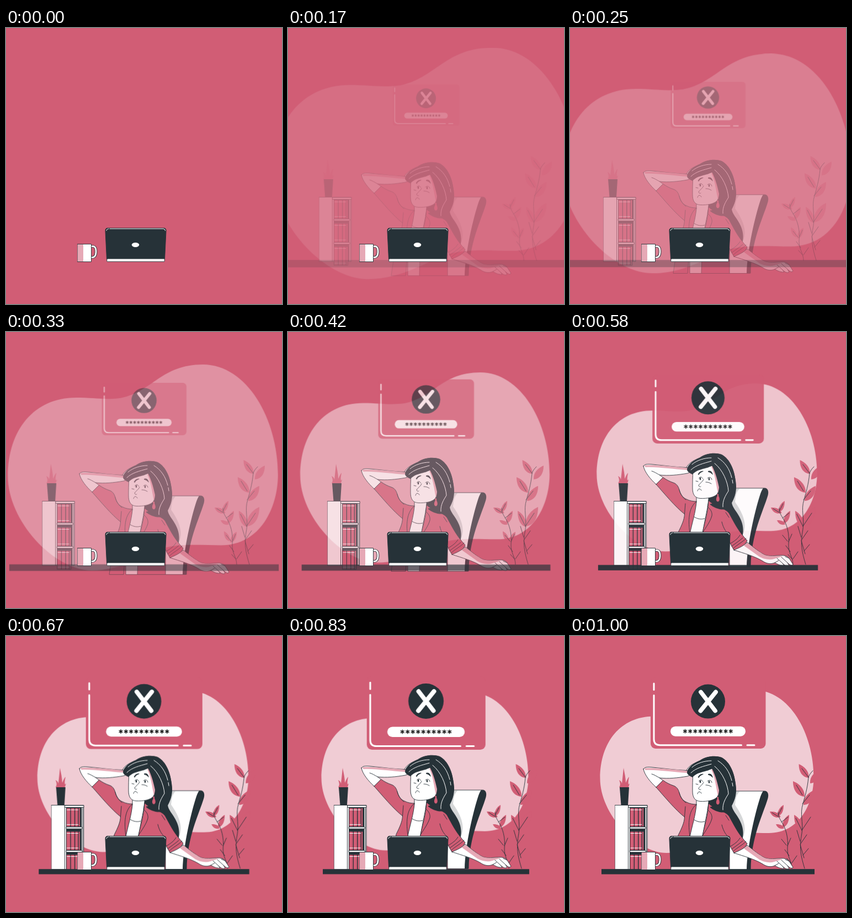
Animation, 500 px wide and 500 px high, one loop 1040 ms. Source, as an HTML page:

```html
<!DOCTYPE html>
<html lang="en">
<head>
<meta charset="utf-8">
<title>Wrong password</title>
<style>
  :root { --red: #d15d75; --dark: #263238; --pale: #e6a9b6; }
  html, body { margin: 0; width: 100%; height: 100%; overflow: hidden; background: var(--red); }
  svg { display: block; width: 100vw; height: 100vh; }

  .enter { animation: enter 1040ms cubic-bezier(.345, .089, .499, 1.367) infinite; }
  .shrink { --from: scale(1.5); }
  .grow { --from: scale(.5); }
  .up { --from: translateY(30px); }
  .right { --from: translateX(-30px); }
  .left { --from: translateX(30px); }
  #blob { transform-origin: 248px 246px; }
  #panel { transform-origin: 250px 139.5px; }
  #desk { transform-origin: 250px 427px; }

  @keyframes enter {
    0% { opacity: 0; transform: var(--from); }
    92.3%, 100% { opacity: 1; transform: none; }
  }

  .w { fill: #fff; }
  .r { fill: var(--red); }
  .d { fill: var(--dark); }
  .p { fill: var(--pale); }
  .line { stroke: var(--dark); stroke-width: .9; stroke-linejoin: round; stroke-linecap: round; }
  .no { fill: none; }
  .shine { fill: none; stroke: #fff; stroke-width: 1; stroke-linecap: round; }
</style>
</head>
<body>
<svg viewBox="0 0 500 500">
  <defs>
    <marker id="star" markerUnits="userSpaceOnUse" markerWidth="10" markerHeight="10" refX="5" refY="5">
      <path d="M5 1.8V8.2M2.2 3.4L7.8 6.6M7.8 3.4L2.2 6.6" stroke="#111" stroke-width="1.5" stroke-linecap="round"/>
    </marker>
    <path id="leaf" d="M0 0C10 4 19 13 18 25C6 24 0 14 0 0Z"/>
    <g id="books">
      <path class="r line" d="M109 0h7.500v34h-7.500zM116.500 0h7.500v34h-7.500zM124 0h6.500v34h-6.500zM130.500 0h3.200v34h-3.200z"/>
      <path class="shine" d="M109.800 3.500h6M117.300 3.500h6M124.800 3.500h5M109.800 30h6M117.300 30h6M124.800 30h5"/>
    </g>
  </defs>

  <path id="blob" class="enter shrink" fill="#f0ccd4" d="M54.500 258C54.500 192 92 145.500 152 145.500C180 145.500 192 149 216 146C262 137 274 98 334 98C397 98 441.500 176 441.500 256C441.500 302 417 357 360 357C330 357 300 354 275 362C240 376 215 393 175 393C120 393 54.500 322 54.500 258Z"/>

  <g id="panel" class="enter grow">
    <rect class="r" x="146" y="75" width="208.500" height="129" rx="9"/>
    <path fill="none" stroke="#fff" stroke-width="3" stroke-linecap="round" d="M152 86V97.500M152 107.500V187Q152 197.700 163 197.700H310.500M321 197.700H334"/>
    <circle class="d" cx="250" cy="118.600" r="31"/>
    <path fill="none" stroke="#fff" stroke-width="7.800" stroke-linecap="round" d="M237 101.500L263 135.500M264 101.500L236.500 135.500"/>
    <rect class="w" x="182" y="163.700" width="136" height="18" rx="9"/>
    <path class="no" marker-start="url(#star)" marker-mid="url(#star)" marker-end="url(#star)" d="M208.500 172.500h9.200h9.200h9.200h9.200h9.200h9.200h9.200h9.200h9.200"/>
  </g>

  <g id="plants" class="enter left">
    <g class="r">
      <use href="#leaf" x="414.500" y="232"/>
      <use href="#leaf" transform="translate(453 242) scale(-1 1)"/>
      <use href="#leaf" transform="translate(404 263) scale(1.150 1.120)"/>
      <use href="#leaf" transform="translate(443 279) scale(-1.100 1.080)"/>
      <use href="#leaf" transform="translate(406 324) scale(.88 1.160)"/>
      <use href="#leaf" transform="translate(443 317) scale(-1.260 1.400)"/>
      <use href="#leaf" transform="translate(362 318) rotate(-22) scale(.8 .66)"/>
      <use href="#leaf" transform="translate(387 306) scale(-.6 .8)"/>
      <use href="#leaf" transform="translate(397 324) scale(-.68 .9)"/>
      <use href="#leaf" transform="translate(373 341) rotate(-22) scale(.62 .5)"/>
      <use href="#leaf" transform="translate(379 361) scale(.6 .72)"/>
      <use href="#leaf" transform="translate(402 362) scale(-.65 .78)"/>
    </g>
    <path class="line no" d="M425 421C418 398 415 384 420 357C423 338 416 322 422 304C425 292 430 278 432 256C433 252 436 248 440 244M421 304L434 288M421 288L410 270M432 256L420 240M420 352L436 328M420 352L409 330M424 402L417 378M422 397L432 385M418 376L429 360M417 372L411 352"/>
    <path class="line no" d="M402 421C402 408 393 400 394 384C396 366 391 348 383 336C379 330 377 325 377 319M383 337L395 328M377 327L366 320M377 325L384 311M392 379L383 368M394 380L400 366M397 398L389 387M402 411L411 398M401 412L393 403"/>
  </g>

  <g id="shelf" class="enter right">
    <path class="r" d="M89 274C92 270 91 266 89 261C93 263 94 266 94 268C95 258 96 250 97 239C99 249 101 257 101 266C103 262 104 258 107 255C106 261 105 265 106 269L108 267L106 274Z"/>
    <path class="d" d="M90 274H107L105 306.500H92.500Z"/>
    <rect class="w line" x="81.500" y="306.500" width="58.500" height="116.500"/>
    <rect class="d" x="108.500" y="310" width="28" height="113"/>
    <path class="line no" d="M105.500 307V423M108.500 307V423M138.500 307V423"/>
    <use href="#books" y="311.500"/>
    <use href="#books" y="354"/>
    <use href="#books" y="396"/>
    <path class="w line" d="M108.500 346h28.500v3.200h-28.500zM108.500 388.500h28.500v3.200h-28.500zM106 307h34v3.500h-34z"/>
  </g>

  <g id="woman" class="enter up">
    <!-- chair -->
    <path class="w line" d="M296 281H351C340 320 327 365 326 423.500H247L285 340Z"/>
    <path fill="#d5d7d8" d="M292 282H307C300 289 300 298 299 306C307 318 324 342 313 366L290 330Z"/>
    <path class="d" d="M350 281C357 279 361 285 358.500 294C350 323 328 364 327.500 423.500H320C321 380 336 318 345 291C347 286 348 283 350 281Z"/>

    <!-- hair behind -->
    <path class="d" d="M236 225C246 218 262 216 274 220C288 227 296 244 299 262C303 280 301 294 293 307C294 316 302 323 307 333C314 346 315 357 312 370L280 345L250 306Z"/>

    <!-- raised arm -->
    <path class="w line" d="M133 241C135 237 142 237 150 238C172 240 192 243 211 243.500C214 237 222 231 234 227L240 235C232 243 222 251 213 254C196 257 178 259 162 257L168.500 261.500L156 274C146 265 135 252 133 241Z"/>
    <path class="p" d="M134 240C142 237 182 241 211 244L226 232L229 240L212 248C188 247 160 242 137 243Z"/>
    <path class="line no" d="M211 243.500C215 246 220 244 226 239M162 257C157 254 152 251 148 250"/>

    <!-- torso -->
    <path class="w line" d="M229 294V306L217 362V423.500H240V362L251 306V290Z"/>
    <path class="line no" d="M225 333C231 337 238 338 244 336"/>
    <path class="r line" d="M156 274L168.500 261.500C175 266 181 269 187 271C193 273 196 277 198 284C200 292 204 298 211 301C217 304 223 305 229 305C228 323 221 345 217.500 362L213 423.500H187L196 361C203 347 207 338 207.500 328C190 314 172 292 156 274Z"/>
    <path class="r line" d="M251 303C261 314 280 316 288 326C297 342 304 358 321 376C318 384 308 390 297 393C294 388 291 383 289 378V423.500H238L240 362C244 342 250 325 251 303Z"/>
    <path class="line no" d="M229 305C217 315 213 332 217 362M251 303L249 315C255 319 258 325 257 331C254 342 246 352 240 362M207.500 328L209 309M198 284C200 292 205 299 210 302M275 342C278 355 284 362 289 366M282 325L288 334M296 390C303 383 311 380 319 372M293 386C300 381 306 377 313 371M291 381C297 377 303 374 308 366"/>

    <!-- resting arm -->
    <path class="w line" d="M297 393C307 389 315 385 321 379C332 388 343 397 353 402C362 405 371 403 380 403C388 402 394 404 397 408L404 419C402 423 397 419 394 416L397 421C393 424 388 420 385 417L388 421C381 422 375 418 371 416C364 419 356 418 349 413C334 404 315 399 297 393Z"/>
    <path class="p" d="M315 385L321 380C332 388 343 397 353 402C362 405 373 403 386 404L370 409C361 412 350 409 343 405Z"/>
    <path class="line no" d="M371 416L378 412M385 417L375 408M394 416L383 406M397 408L390 405"/>

    <!-- head -->
    <path class="w line" d="M223 249C222 261 222 270 222 281C222 292 226 299 236 299.500C248 300 262 298 267 291C274 278 268 254 260 240Z"/>
    <path class="p" d="M256 242L262 240C269 255 273 274 268 290C265 276 263 257 256 242Z"/>
    <path class="d" d="M222 256C217 254 212 251 212 247C213 238 224 230 236 225C248 217 264 216 275 220C290 228 299 250 300 270C302 290 297 302 287 318C276 322 262 318 253 310C269 307 273 296 271 284C268 269 264 253 257 240C247 247 232 245 222 256Z"/>
    <path class="shine" d="M219 248C228 239 242 236 256 232M221 238C230 230 244 226 256 226M268 226C281 234 289 246 293 262M262 236C277 248 286 270 287 286C282 294 276 303 277 315M294 266L295 272"/>
    <path class="d" d="M231.500 256C234 251 238 249 242 250C239 252 235 253 233.500 257ZM250 250C255 248 258 252 259 257C256 254 253 252 250 251.500Z"/>
    <path class="line no" d="M233.500 263C235 260 239 260 240.500 263.500M249 263C252 260 256 261 257 265.500M242 265C240 270 234 273 233 276C234 279 236 279 237 278M231 286C232 281 236 281 238 285M246 270C250 270 253 271 256 273M228 268L232 269"/>
    <ellipse class="d" cx="236" cy="264" rx="1.300" ry="2.300"/>
    <ellipse class="d" cx="252" cy="264.500" rx="1.300" ry="2.300"/>
    <path class="r" d="M266 292C268 290 270 292 269 295C272 300 271 305 268 305.500C264 305 264 299 267 295Z"/>
  </g>

  <rect id="desk" class="enter shrink d" x="57" y="422.200" width="386" height="9.400"/>

  <g id="mug">
    <path class="no" stroke="#263238" stroke-width="4.600" d="M154 396C161 394 163.500 398 163 407C162.500 414 159 416 154 415.500"/>
    <path class="no" stroke="#fff" stroke-width="2.800" d="M154 396C161 394 163.500 398 163 407C162.500 414 159 416 154 415.500"/>
    <rect class="w" x="129.500" y="391.500" width="25" height="32"/>
    <rect class="p" x="130" y="392" width="10" height="31"/>
    <rect class="line no" x="129.500" y="391.500" width="25" height="32"/>
  </g>

  <g id="laptop">
    <path class="d line" d="M184 362.500H286Q290.500 362.500 290 368L287.500 419H182.500L180 368Q179.500 362.500 184 362.500Z"/>
    <path class="shine" d="M182 367Q182 364 186 363.700M188 363.700H285Q288.500 364 288.500 367"/>
    <rect class="w line" x="182.800" y="418" width="104.400" height="5.200" rx=".8"/>
    <ellipse class="w" cx="234.500" cy="392.800" rx="6.800" ry="4.100"/>
  </g>
</svg>
</body>
</html>
```
